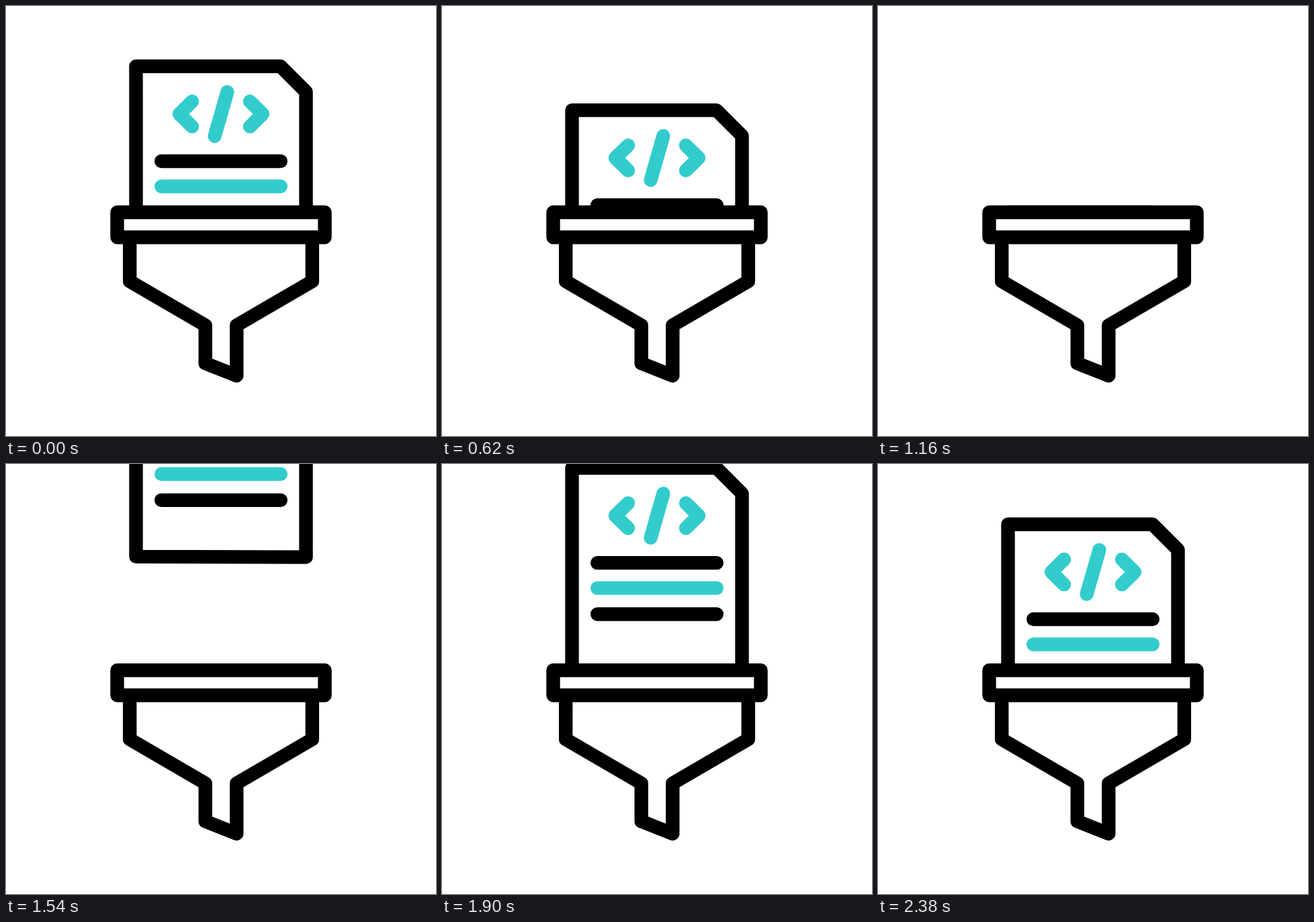
These frames come from a looping animation (640x640 px, 2.4 s). An HTML page with a canvas:

```html
<!DOCTYPE html>
<html lang="en">
<head>
<meta charset="utf-8">
<title>Code filter</title>
<style>
  html, body { margin: 0; width: 100%; height: 100%; overflow: hidden; background: #fff; }
  canvas { display: block; width: 640px; height: 640px; }
</style>
</head>
<body>
<canvas id="stage"></canvas>
<script>
const SIZE = 640, MID = SIZE / 2;
const LOOP = 2400, STEP = 20, REST = 20;
const INK = '#000', TEAL = '#33cccc';
const LINE = 20.4;
const RIM_TOP = 307, RIM_BOTTOM = 344.2;

const canvas = document.getElementById('stage');
const ctx = canvas.getContext('2d');
const ratio = Math.max(1, window.devicePixelRatio || 1);
canvas.width = canvas.height = SIZE * ratio;

// All x positions are measured from the vertical centre line.
function stroke(color, points, closed) {
  ctx.beginPath();
  points.forEach(([x, y]) => ctx.lineTo(x, y));
  if (closed) ctx.closePath();
  ctx.strokeStyle = color;
  ctx.stroke();
}

function textLine(color, y) {
  const half = 88.8;
  stroke(color, [[-half, y], [half, y]]);
}

function chevron(side) {
  const y = 160.7, rise = 18.7, inner = 43, tip = inner + 19;
  stroke(TEAL, [[side * inner, y - rise], [side * tip, y], [side * inner, y + rise]]);
}

function drawPage() {
  const half = 126.5, top = 89.7, bottom = 391.7, cut = 38;
  stroke(INK, [[-half, top], [half - cut, top], [half, top + cut],
               [half, bottom + 0.4], [-half, bottom - 0.4]], true);
  chevron(-1);
  chevron(1);
  stroke(TEAL, [[9.4, 128], [-9.4, 193.6]]);
  textLine(INK, 231);
  textLine(TEAL, 268.5);
  textLine(INK, 307.3);
}

function drawFunnel() {
  const rim = 154.5, wall = 135.8, neck = 23.3;
  const side = s => [[s * wall, RIM_BOTTOM], [s * wall, 409.8],
                     [s * neck, 475.3], [s * neck, 541 + s * 9.2]];
  stroke(INK, [[-rim, RIM_TOP], [rim, RIM_TOP], [rim, RIM_BOTTOM], [-rim, RIM_BOTTOM]], true);
  stroke(INK, [...side(-1), ...side(1).reverse()]);
}

// Distance from the resting pose: accelerates, then levels off slightly.
function travel(ms) {
  const x = Math.max(0, ms) / 1000;
  return 182 * x * x * (1 - 0.0373 * x ** 6);
}

// The page sinks into the funnel, then a new one drops in at twice the speed.
function pageShift(t) {
  return t < LOOP / 2 + REST ? travel(t - REST) : -2 * travel(LOOP - REST - t);
}

function draw(t) {
  ctx.setTransform(ratio, 0, 0, ratio, MID * ratio, 0);
  ctx.fillStyle = '#fff';
  ctx.fillRect(-MID, 0, SIZE, SIZE);
  ctx.lineWidth = LINE;
  ctx.lineCap = ctx.lineJoin = 'round';

  ctx.save();
  ctx.beginPath();
  ctx.rect(-MID, 0, SIZE, RIM_TOP);
  ctx.clip();
  ctx.translate(0, pageShift(t));
  drawPage();
  ctx.restore();

  drawFunnel();
}

let start = null;
function tick(now) {
  if (start === null) start = now;
  const t = (now - start) % LOOP;
  draw(Math.floor(t / STEP + 0.001) * STEP);
  requestAnimationFrame(tick);
}
draw(0);
requestAnimationFrame(tick);
</script>
</body>
</html>
```
